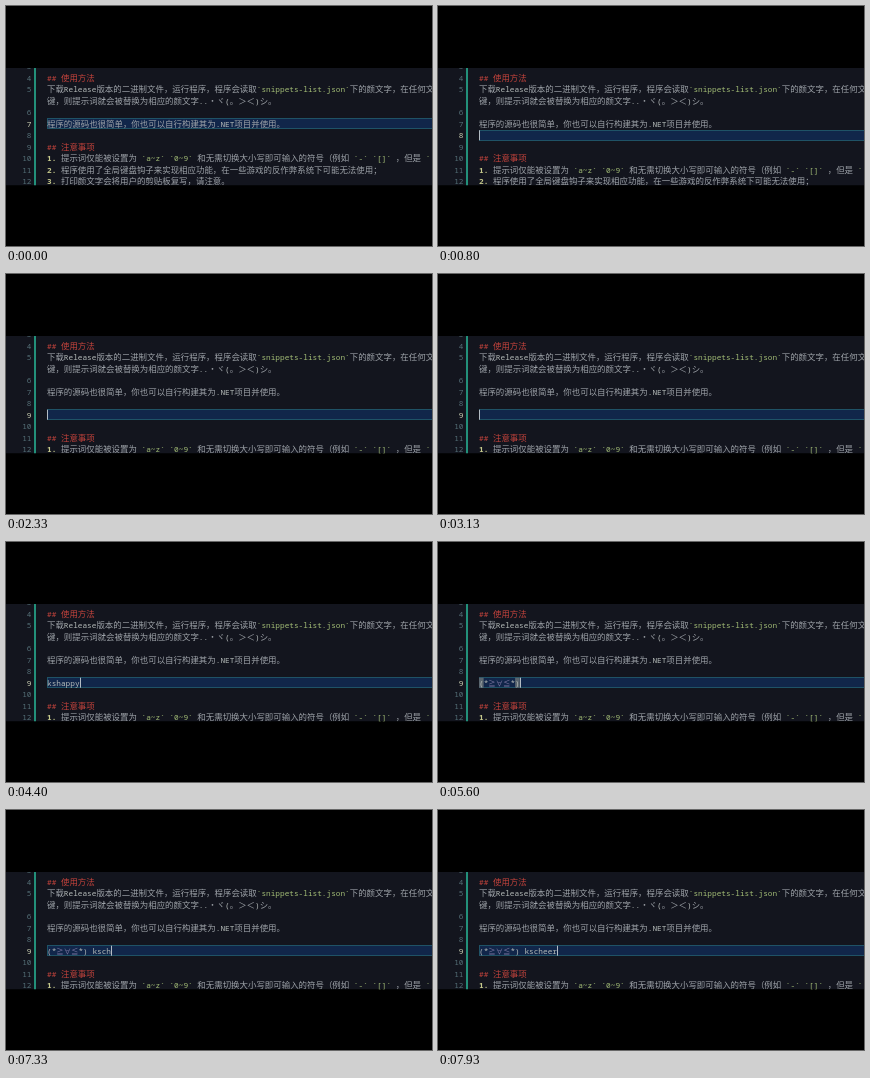
Animation of 426x240 px, one loop 8 s. Source, as an HTML page with a canvas:

```html
<!DOCTYPE html>
<html lang="zh-CN">
<head>
<meta charset="utf-8">
<title>Editor</title>
<style>
  html, body { margin: 0; width: 100%; height: 100%; overflow: hidden; background: #000; }
  canvas { display: block; width: 426px; height: 240px; }
</style>
</head>
<body>
<canvas id="stage"></canvas>
<script>
const W = 426, H = 240, LOOP = 8000;
const TOP = 62, BOTTOM = 179.5, LEFT = 41, PITCH = 11.45, FIRST = 72;
const MONO = '500 7.75px "Noto Sans Mono", "DejaVu Sans Mono", monospace';
const BOLD = MONO.replace('500', 'bold');
const CJK = '8.45px "Noto Sans CJK SC", "Noto Sans CJK", sans-serif';
const SYMBOL = '7.4px "Noto Sans CJK SC", "Noto Sans CJK", sans-serif';
const COLOR = {
  back: '#13151e', text: '#b4bab8', han: '#9da2a8', code: '#a3bd76', head: '#c2433c',
  list: '#c6c98c', number: '#557078', active: '#cdd2b4', git: '#23907a',
  line: '#11264a', edge: '#1f5266', caret: '#b4bcc4', symbol: '#8078a4',
  bracket: '#59656e', trailing: '#6e2a32'
};

const BEFORE = [
  { n: 4, s: '## 使用方法' },
  { n: 5, s: '下载Release版本的二进制文件，运行程序，程序会读取`snippets-list.json`下的颜文字，在任何文本' },
  { s: '键，则提示词就会被替换为相应的颜文字..・ヾ(。＞＜)シ。' },
  { n: 6, s: '' },
  { n: 7, s: '程序的源码也很简单，你也可以自行构建其为.NET项目并使用。' }
];
const AFTER = [
  '', '## 注意事项',
  '1. 提示词仅能被设置为 `a~z` `0~9` 和无需切换大小写即可输入的符号（例如 `-` `[]` ，但是 `',
  '2. 程序使用了全局键盘钩子来实现相应功能，在一些游戏的反作弊系统下可能无法使用；',
  '3. 打印颜文字会将用户的剪贴板复写，请注意。'
];

// Edits in order: time, number of new lines, text on the last new line.
const FACE = '(*≧∀≦*)';
const edits = [[-600, 0, ''], [700, 1, ''], [950, 2, '']];
function type(start, step, word, prefix) {
  for (let i = 1; i <= word.length; i++)
    edits.push([start + (i - 1) * step, 2, prefix + word.slice(0, i)]);
}
type(3290, 130, 'kshappy', '');
edits.push([5200, 2, FACE], [5950, 2, FACE + ' ']);
type(6800, 140, 'kscheer', FACE + ' ');

const canvas = document.getElementById('stage');
const ctx = canvas.getContext('2d');
const ratio = window.devicePixelRatio || 1;
canvas.width = W * ratio;
canvas.height = H * ratio;

function rect(x, y, w, h, color) {
  ctx.fillStyle = color;
  ctx.fillRect(x, y, w, h);
}

function widthOf(s) {
  ctx.font = MONO;
  return ctx.measureText(s).width;
}

// Draws mixed-script text and returns the x position after it.
function write(s, x, y, color, mono = MONO) {
  for (const run of s.match(/[\x20-\x7e]+|[≧∀≦]+|[^\x20-\x7e≧∀≦]+/g) || []) {
    const latin = run.charCodeAt(0) < 127, symbol = /[≧∀≦]/.test(run);
    ctx.font = latin ? mono : symbol ? SYMBOL : CJK;
    ctx.fillStyle = color || (latin ? COLOR.text : symbol ? COLOR.symbol : COLOR.han);
    ctx.fillText(run, x, y);
    x += ctx.measureText(run).width;
  }
  return x;
}

function writeLine(s, y) {
  if (s.startsWith('##')) return write(s, LEFT, y, COLOR.head);
  let x = LEFT;
  const mark = s.match(/^\d\./);
  if (mark) {
    x = write(mark[0], x, y, COLOR.list, BOLD);
    s = s.slice(mark[0].length);
  }
  for (const part of s.match(/`[^`]*`?|[^`]+/g) || [])
    x = write(part, x, y, part[0] === '`' && COLOR.code);
  return x;
}

function writeNumber(n, y, active) {
  ctx.textAlign = 'right';
  ctx.font = MONO;
  ctx.fillStyle = active ? COLOR.active : COLOR.number;
  ctx.fillText(n, 25.5, y);
  ctx.textAlign = 'left';
}

function drawActiveLine(s, mid, caretOn) {
  const top = Math.round(mid - 5.7), y = mid + 2.9, cell = widthOf('0');
  rect(LEFT, top, W - LEFT, 11, COLOR.line);
  ctx.strokeStyle = COLOR.edge;
  ctx.lineWidth = 1;
  ctx.strokeRect(LEFT + 0.5, top + 0.5, W, 10);

  const end = writeLine(s, y);
  if (s === FACE) {
    for (const [x, paren] of [[LEFT, '('], [end - cell, ')']]) {
      rect(x, mid - 5, cell, 10, COLOR.bracket);
      write(paren, x, y);
    }
  }
  if (s.endsWith(' ')) rect(end - cell, mid - 4.7, cell, 9.5, COLOR.trailing);
  if (caretOn) rect(Math.round(end), mid - 5, 1, 10, COLOR.caret);
}

function draw(t) {
  const [at, added, typed] = edits.filter(e => e[0] <= t).pop();
  const rows = BEFORE.slice();
  for (let i = 1; i <= added; i++) rows.push({ n: 7 + i, s: i === 2 ? typed : '' });
  AFTER.forEach((s, i) => rows.push({ n: 8 + added + i, s }));

  ctx.setTransform(ratio, 0, 0, ratio, 0, 0);
  rect(0, 0, W, H, '#000');
  ctx.save();
  ctx.beginPath();
  ctx.rect(0, TOP, W, BOTTOM - TOP);
  ctx.clip();
  rect(0, TOP, W, BOTTOM - TOP, COLOR.back);
  rect(28, TOP, 2, BOTTOM - TOP, COLOR.git);
  writeNumber(3, FIRST - PITCH + 2.9, false);

  rows.forEach((row, i) => {
    const mid = FIRST + i * PITCH, active = row.n === 7 + added;
    if (row.n) writeNumber(row.n, mid + 2.9, active);
    if (active) drawActiveLine(row.s, mid, (t - at) % 1000 < 500);
    else writeLine(row.s, mid + 2.9);
  });
  ctx.restore();
}

function frame() {
  draw(performance.now() % LOOP);
  requestAnimationFrame(frame);
}
frame();
</script>
</body>
</html>
```
